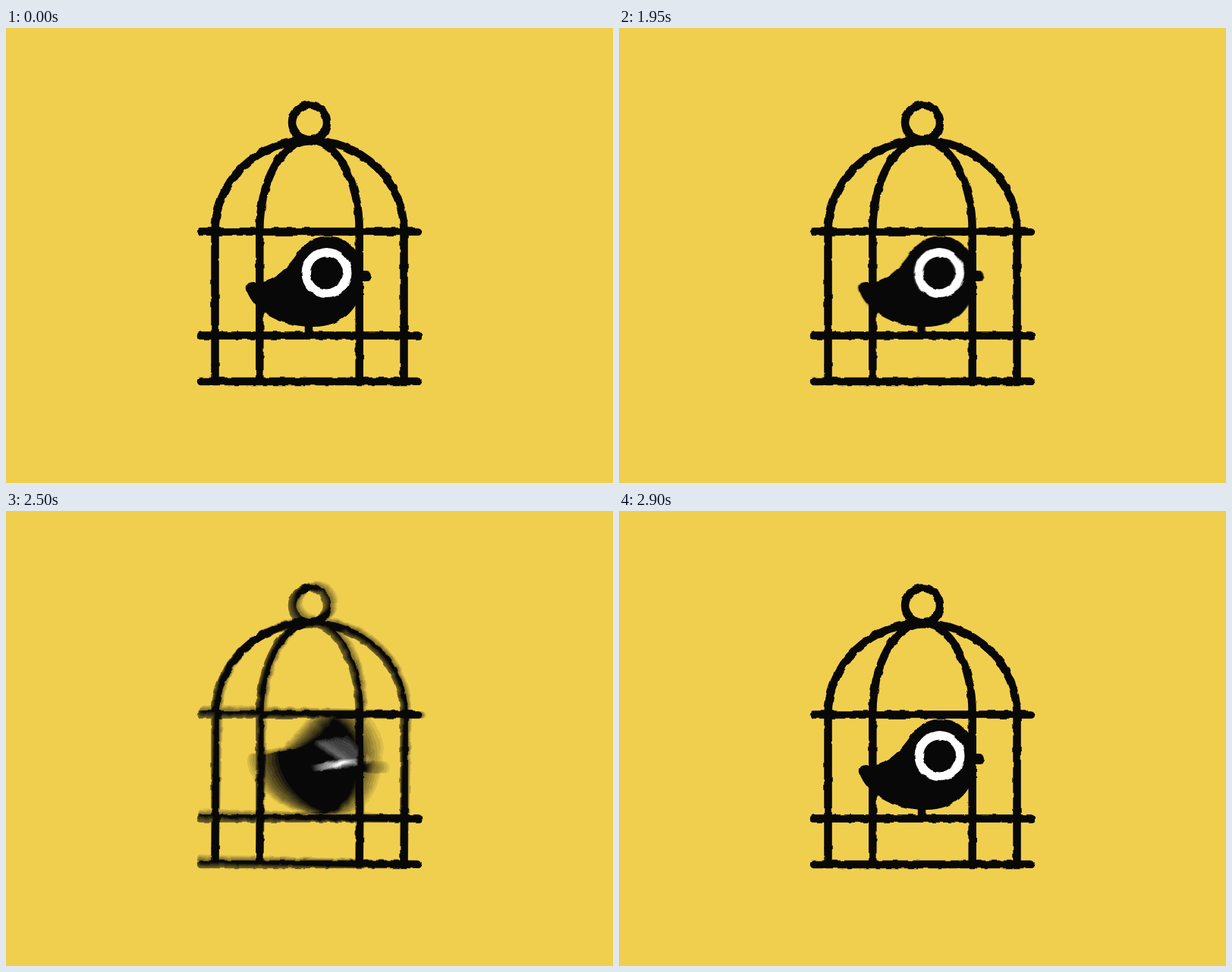
An HTML page with a canvas that plays this animation: 800x600 px, repeating every 3.4 s.

```html
<!DOCTYPE html>
<html lang="en">
<head>
<meta charset="utf-8">
<title>Caged bird</title>
<style>
  html, body { margin: 0; width: 100%; height: 100%; overflow: hidden; background: #f0cf4f; }
  canvas { display: block; width: 800px; height: 600px; filter: url(#rough); }
  svg { position: absolute; width: 0; height: 0; }
</style>
</head>
<body>
<svg aria-hidden="true">
  <filter id="rough" x="0" y="0" width="100%" height="100%" color-interpolation-filters="sRGB">
    <feTurbulence type="fractalNoise" baseFrequency="0.1" numOctaves="1" seed="4" result="noise"/>
    <feDisplacementMap in="SourceGraphic" in2="noise" scale="4.5" xChannelSelector="R" yChannelSelector="G"/>
  </filter>
</svg>
<canvas id="stage" width="800" height="600"></canvas>
<script>
const LOOP = 3400, STEP = 50, SHUTTER = 26, SAMPLES = 12;
const YELLOW = '#f0cf4f', BLACK = '#080808', WHITE = '#fff';
const WIDTH = 10.5;

// the bird is drawn around its own centre; a pose is the matrix that places it
const BODY = new Path2D('M-83 11 Q-85 0 -74 0 C-50 1 -33 -14 -18 -35 C-9 -51 6 -60.5 24 -60.5 ' +
  'C50 -60.5 71 -40 71 -9 C71 33 45 59 5 59 C-42 59 -74 37 -83 11Z');
const REST = [1, 0, 0, 1, 400, 335];
const CROUCH = [.97, .12, 0, 1.04, 378, 336];
const HIT = [.81, .33, -.3, 1.23, 455, 325];

const span = (t, from, to) => Math.min(1, Math.max(0, (t - from) / (to - from)));
const easeOut = k => k * (2 - k);
const easeInOut = k => k * k * (3 - 2 * k);
const wobble = (k, turns) => Math.sin(2 * Math.PI * turns * k) * (1 - k);
const mix = (a, b, k) => a.map((v, i) => v + (b[i] - v) * k);

const impact = t => span(t, 2500, 2900);
const tilt = t => 8.8 * wobble(impact(t), 1) * Math.PI / 180;

function pose(t) {
  const slid = [...REST];
  slid[4] -= 23 * easeOut(span(t, 1950, 2200));
  const ready = mix(slid, CROUCH, easeInOut(span(t, 2200, 2400)));
  const m = t < 2600
    ? mix(ready, HIT, easeInOut(span(t, 2460, 2550)))
    : mix(HIT, REST, easeInOut(span(t, 2600, 2880)));
  m[4] += 20 * wobble(impact(t), 2);
  return m;
}

// 1 open, 0 shut; two blinks, 800 ms apart
function lid(t) {
  const p = t < 1300 ? (t - 300) % 800 : -1;
  if (p < 0 || p >= 200) return 1;
  return p < 150 ? 0 : .55;
}

const ctx = document.getElementById('stage').getContext('2d');
const buffer = document.createElement('canvas');
buffer.width = 800;
buffer.height = 600;
const g = buffer.getContext('2d');
g.lineCap = g.lineJoin = 'round';

function line(points, width, color) {
  g.beginPath();
  for (let i = 0; i < points.length; i += 2) g.lineTo(points[i], points[i + 1]);
  g.lineWidth = width;
  g.strokeStyle = color;
  g.stroke();
}

function oval(x, y, r, k, color) {
  g.beginPath();
  g.ellipse(x, y, r, r * k, 0, 0, 7);
  g.fillStyle = color;
  g.fill();
}

function drawEye(frameTime) {
  const x = 22.5, y = -12, open = lid(frameTime);
  if (frameTime >= 2200 && frameTime < 2750) line([13, -27, 50, -11.5, 11, 3.5], 8, WHITE);
  else if (!open) line([x - 28, y, x + 28, y], 8, WHITE);
  else {
    oval(x, y, 33, open, WHITE);
    oval(x, y, 21.5, open, BLACK);
  }
}

function drawBird(t, frameTime) {
  const m = pose(t);
  g.save();
  g.transform(...m);
  line([-1, 45, -1, 66 / m[3] ** 2], WIDTH, BLACK); // the leg tucks in as the body stretches
  line([55, -8, 75, -8], 14, BLACK);
  g.fillStyle = BLACK;
  g.fill(BODY);
  drawEye(frameTime);
  g.restore();
}

// origin at the bottom right corner, on which the cage tips
function drawCage(t) {
  g.save();
  g.translate(545, 466);
  g.rotate(tilt(t));
  g.translate(-145, 0);
  g.lineWidth = WIDTH;
  g.strokeStyle = BLACK;
  for (const rx of [124.5, 65.7]) {
    g.beginPath();
    g.moveTo(-rx, -3);
    g.ellipse(0, -198, rx, 120, 0, Math.PI, 2 * Math.PI);
    g.lineTo(rx, -3);
    g.stroke();
  }
  g.beginPath();
  g.arc(0, -341.5, 23, 0, 7);
  g.stroke();
  for (const y of [-197.5, -60.5, 0]) line([-143, y, 143, y], WIDTH, BLACK);
  g.restore();
}

// averages moments around the frame time for motion blur
function render(frameTime) {
  const moving = frameTime >= 1950 && frameTime < 2900;
  const count = moving ? SAMPLES : 1;
  for (let i = 0; i < count; i++) {
    const t = frameTime + ((i + .5) / count - .5) * SHUTTER;
    g.fillStyle = YELLOW;
    g.fillRect(0, 0, 800, 600);
    drawBird(t, frameTime);
    drawCage(t);
    ctx.globalAlpha = 1 / (i + 1);
    ctx.drawImage(buffer, 0, 0);
  }
}

let shown = -1;
const begin = performance.now();
function tick() {
  const t = (performance.now() - begin) % LOOP;
  const frameTime = Math.floor(t / STEP) * STEP;
  if (frameTime !== shown) render(shown = frameTime);
  requestAnimationFrame(tick);
}
tick();
</script>
</body>
</html>
```
